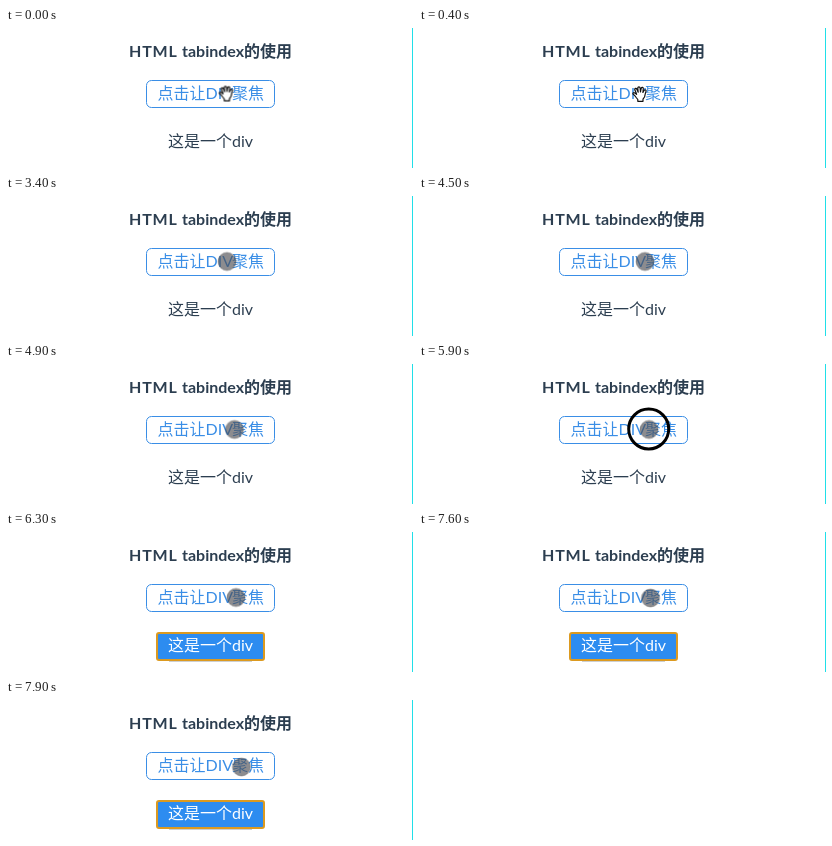
Write an HTML page that moves like this. It is 407 by 140 pixels and loops after 8000 ms.

```html
<!DOCTYPE html>
<html lang="zh-CN">
<head>
<meta charset="utf-8">
<title>HTML tabindex</title>
<style>
html, body { margin: 0; width: 100%; height: 100%; overflow: hidden; background: #fff; }
svg { display: block; width: 407px; height: 140px; }
text { font: 16px Lato, "Noto Sans CJK SC", "Noto Sans CJK", sans-serif; fill: #2c3e50; }
.title { font-weight: 700; }
.button text { fill: #3a8ee6; }
.button rect { fill: #fff; stroke: #3a8ee6; }
.focus text { fill: #fff; }
.focus, .ring, .hand, .dot { animation: 8s step-end infinite; }
.focus { animation-name: focus; }
.ring { animation-name: ring; }
.hand { animation-name: hand; }
.dot { animation-name: dot; }

@keyframes focus {
  0% { visibility: hidden; }
  78.75%, 100% { visibility: visible; }
}
@keyframes ring {
  0%, 78.75%, 100% { visibility: hidden; }
  73.75% { visibility: visible; }
}
@keyframes hand {
  0% { transform: translate(212.5px, 57.5px); visibility: visible; }
  3.75% { transform: translate(212.8px, 57.8px); }
  5% { transform: translate(213px, 58px); visibility: visible; }
  42.5%, 100% { transform: translate(213px, 58px); visibility: hidden; }
}
@keyframes dot {
  0% { transform: translate(221px, 65.5px); visibility: hidden; }
  42.5% { transform: translate(221px, 65.5px); visibility: visible; }
  55% { transform: translate(223.5px, 65.5px); }
  56.25% { transform: translate(226px, 65.5px); }
  58.75% { transform: translate(227px, 65.5px); animation-timing-function: steps(2); }
  61.25% { transform: translate(228.5px, 65.5px); animation-timing-function: steps(4); }
  66.25% { transform: translate(230px, 65.5px); }
  95% { transform: translate(231.5px, 66px); animation-timing-function: steps(3); }
  98.75%, 100% { transform: translate(235.5px, 67px); visibility: visible; }
}
</style>
</head>
<body>
<svg viewBox="0 0 407 140">
  <rect x="406" width="1" height="140" fill="#20dfe8"/>

  <g class="title">
    <text class="title" x="123" y="29" letter-spacing=".8">HTML</text>
    <text class="title" x="176" y="29">tabindex</text>
    <text class="title" x="238" y="29">的使用</text>
  </g>

  <g class="button">
    <rect x="140.5" y="52.5" width="128" height="27" rx="5"/>
    <text x="151.5" y="71">点击让</text>
    <text x="199.5" y="71">DIV</text>
    <text x="226" y="71">聚焦</text>
  </g>

  <text x="162" y="119">这是一个div</text>

  <g class="focus">
    <path d="M163 129H246" stroke="#59636c" stroke-opacity=".6"/>
    <rect x="151" y="101" width="107" height="27" rx="2" fill="#2d8cf0" stroke="#dc9a20" stroke-width="2"/>
    <text x="162" y="119">这是一个div</text>
  </g>

  <circle class="dot" r="9" fill="#4b4b50" fill-opacity=".64" stroke="#444" stroke-opacity=".35"/>
  <circle class="ring" cx="229.7" cy="65" r="20" fill="none" stroke="#000" stroke-width="3"/>
  <path class="hand" fill="#fff" stroke="#111" stroke-width="1.2" stroke-linejoin="round"
    d="M4.2 11.5C3.5 10.5 2.5 9.3 1.2 8.3C.3 7.3 1.5 6.2 2.8 7L4.6 8.4C4.2 6.6 3.2 5 2.8 3.8C2.4 2.2 4.3 1.8 4.9 3.3L6.2 6.2C6 4.5 5.8 3 5.8 1.9C5.9.5 7.9.5 8.1 1.9L8.5 5.9C8.7 4.4 9 3 9.3 2.1C9.8.9 11.5 1.3 11.3 2.7L10.9 6.5C11.4 5.3 11.9 4.6 12.4 4.1C13.3 3.4 14.5 4.2 14 5.4C13.2 7.5 13 9.5 12.5 11L11 13.2V15.3H5.8V13.5Z"/>
</svg>
</body>
</html>
```
